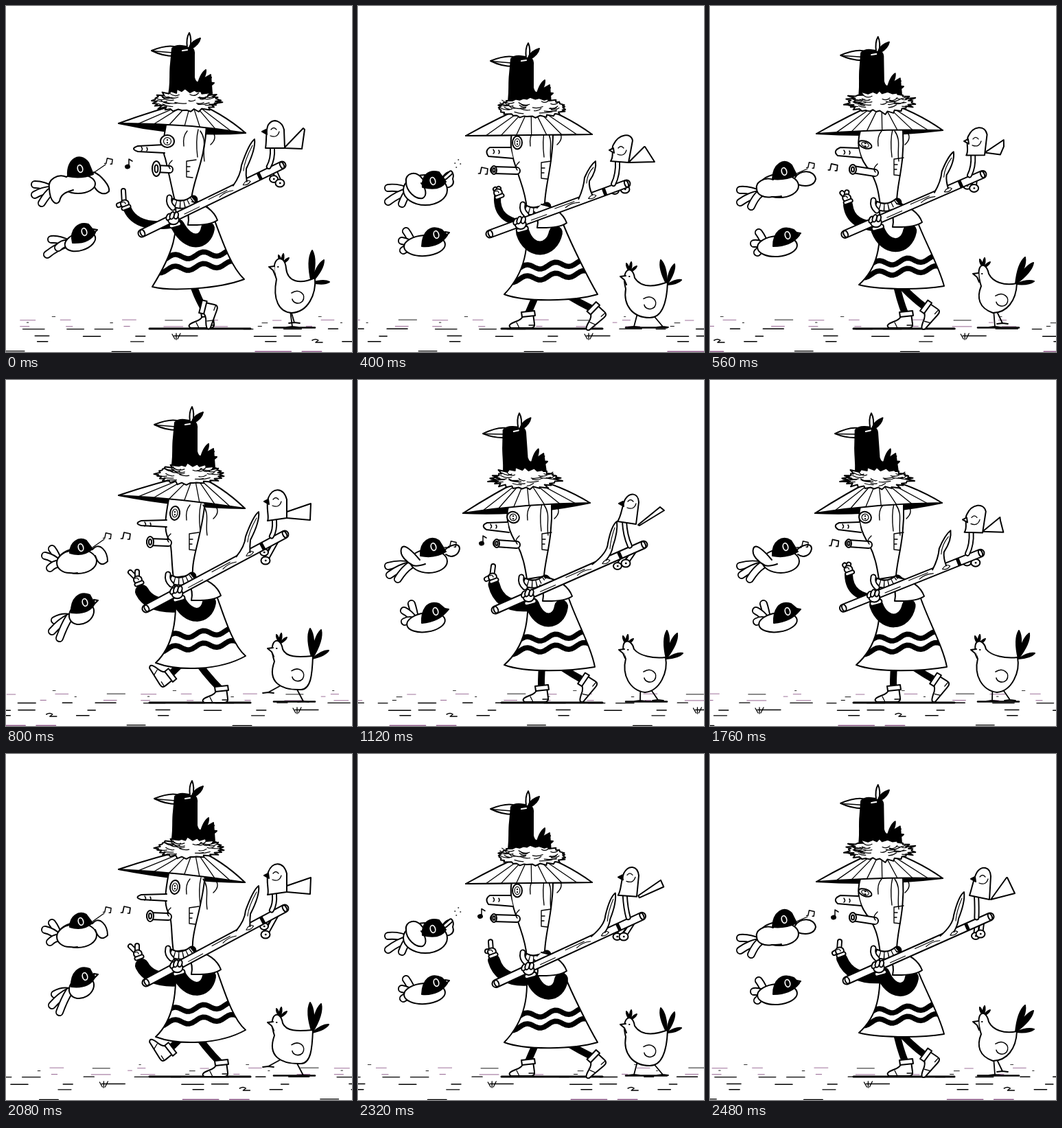
Recreate the animation shown at these times as an HTML page. Size 504 by 504 pixels, loop 2560 ms.

```html
<!DOCTYPE html>
<html lang="en">
<head>
<meta charset="utf-8">
<title>Walk with birds</title>
<style>
html, body { margin: 0; width: 100%; height: 100%; overflow: hidden; background: #fff; }
svg { display: block; width: 504px; height: 504px; }
</style>
</head>
<body>
<svg id="stage" viewBox="0 0 504 504" fill="none" stroke="#000" stroke-width="2" stroke-linejoin="round" stroke-linecap="round"></svg>
<script>
const stage = document.getElementById('stage');
const STEP = 80, FRAMES = 32, SCROLL = 563.2;
const NUM = /-?\d+(\.\d+)?/g;
const nums = s => s.match(NUM).map(Number);

// Blend the numbers of the two key strings around a cyclic phase.
function at(keys, phase, period = 8) {
  phase %= period;
  const ks = Object.keys(keys).map(Number);
  let i = ks.length - 1;
  while (i >= 0 && ks[i] > phase) i--;
  const a = i < 0 ? ks[ks.length - 1] - period : ks[i];
  const b = i + 1 < ks.length ? ks[i + 1] : ks[0] + period;
  const t = (phase - a) / (b - a), to = nums(keys[b % period]);
  let j = 0;
  return keys[(a + period) % period].replace(NUM, n => +(+n + (to[j++] - n) * t).toFixed(1));
}
const val = (keys, phase, period) => nums(at(keys, phase, period));

function random(seed) {
  return () => {
    seed = (seed + 0x6D2B79F5) | 0;
    let t = Math.imul(seed ^ (seed >>> 15), 1 | seed);
    t = (t + Math.imul(t ^ (t >>> 7), 61 | t)) ^ t;
    return ((t ^ (t >>> 14)) >>> 0) / 4294967296;
  };
}

const shape = (d, fill = '#fff') => `<path d="${d}" fill="${fill}"/>`;
const line = (d, w = 1.6, c = '#000', more = '') => `<path d="${d}" stroke="${c}" stroke-width="${w}" ${more}/>`;
const tube = (d, w) => line(d, w) + line(d, w - 3.8, '#fff');
const oval = (x, y, rx, ry, rot = 0, fill = '#fff') =>
  `<ellipse cx="${x}" cy="${y}" rx="${rx}" ry="${ry}" fill="${fill}" transform="rotate(${rot} ${x} ${y})"/>`;
const move = (x, y, body, rot = 0) => `<g transform="translate(${x} ${y}) rotate(${rot})">${body}</g>`;

// Feathers fan out from the first point to each following one.
function fan([bx, by, ...tips], draw) {
  let out = '';
  for (let i = 0; i < tips.length; i += 2) out += draw(bx, by, tips[i], tips[i + 1]);
  return out;
}
const feather = (x, y, u, v) => tube(`M${x} ${y}Q${(x + u) / 2} ${(y + v) / 2 - 4} ${u} ${v}`, 12);
const plume = (x, y, u, v) => {
  const dx = (u - x) * .7, dy = (v - y) * .7, n = .25;
  return shape(`M${x} ${y}Q${x + dx - dy * n} ${y + dy + dx * n} ${u} ${v}Q${x + dx + dy * n} ${y + dy - dx * n} ${x} ${y}Z`, '#000');
};

/* ---- ground ---- */
const rnd = random(11);
const dashes = [];
const row = (y, count, min, max, w, tint) => {
  for (let i = 0; i < count; i++)
    dashes.push({ x: (i + rnd() * .7) * SCROLL / count, y: y + rnd(), n: min + rnd() * (max - min), w, c: rnd() < tint ? '#93618f' : '#000' });
};
row(452, 3, 2, 6, .8, .5);
row(457, 8, 5, 30, .9, .7);
row(461, 5, 2, 8, .9, .3);
row(466, 8, 5, 32, 1, .7);
row(470, 9, 12, 34, 1.4, 0);
row(480.5, 7, 10, 34, 1.5, 0);
row(488.5, 4, 6, 28, 1.4, 0);
row(502.5, 4, 20, 60, 1.3, .2);

function ground(frame) {
  const shift = SCROLL * frame / FRAMES;
  const twice = (x, draw) => {
    const p = (x + shift) % SCROLL;
    return draw(p) + draw(p - SCROLL);
  };
  return dashes.map(d => twice(d.x, x => line(`M${x} ${d.y}h${d.n}`, d.w, d.c))).join('') +
    twice(248, x => move(x, 481, line('M-6 -3L-2 4M0 -4V5M6 -4L2 4', 1.3))) +
    twice(454, x => move(x, 487, line('M-8 0q5 -3 9 0l-4 3h10', 1.5))) +
    line('M209 470H356', 3) + line('M390 468.5H450', 2.6);
}

/* ---- flying birds ---- */
const upper = {
  body: { 0: '105 259 25 14', 2: '104 264 28 18', 5: '98 268 32 22', 6: '103 264 27 17', 7: '101 262 28 17' },
  head: {
    0: 'M90 248C88 222 108 212 120 228L127 245Q110 252 90 248Z',
    2: 'M93 252C93 236 106 228 117 234L126 246Q112 258 93 252Z',
    5: 'M94 264C92 246 104 238 118 242L128 256Q120 270 94 264Z',
    6: 'M91 256C90 234 106 226 118 234L128 250Q112 260 91 256Z',
    7: 'M91 252C92 230 108 220 119 232L126 246Q110 254 91 252Z'
  },
  eye: { 0: '108 237', 2: '109 244', 5: '109 255', 6: '110 243', 7: '108 241' },
  wing: {
    0: 'M88 249C76 244 60 252 63 266C64 286 74 292 78 284C80 272 92 270 98 268',
    2: 'M93 249C84 250 74 258 74 266C74 276 84 281 92 281C96 281 100 282 104 281',
    5: 'M94 252C84 238 68 244 70 256C70 270 84 282 94 280C102 276 98 264 92 258',
    6: 'M90 262C80 250 66 236 63 246C60 256 72 266 80 270C86 272 92 270 98 268',
    7: 'M92 253C78 248 66 258 68 266C68 276 80 280 90 278C96 278 100 278 104 277'
  },
  far: {
    0: 'M128 242C138 246 152 262 150 270C144 276 134 274 128 262',
    2: 'M126 247C136 234 148 250 148 264C140 272 134 268 130 256',
    5: 'M124 248C132 238 142 240 138 252C142 262 130 268 124 262',
    6: 'M126 248C134 240 148 236 148 246C146 256 136 260 128 254',
    7: 'M124 250C130 238 152 238 154 252C152 262 140 264 128 260'
  },
  tail: { 0: '68 268 42 260 42 275 52 287', 2: '78 268 67 246 57 256 64 274', 5: '74 270 44 265 44 285 64 288', 6: '76 270 44 271 46 284 58 290', 7: '72 274 44 268 44 286 60 292' },
  tune: { 0: '150 226', 2: '148 227', 5: '144 225', 6: '138 239', 7: '147 232' }
};
const lower = {
  body: { 0: '108 343 23 13 -18', 2: '110 340 19 15 -30', 5: '97 349 30 15 -4', 6: '99 353 28 14 -8', 7: '98 350 29 15 -4' },
  head: {
    0: 'M97 345C92 325 106 314 120 318L130 330Q122 346 97 345Z',
    2: 'M95 339C94 319 106 307 122 313L129 326Q120 342 95 339Z',
    5: 'M93 350C94 328 106 318 122 326L130 334Q118 352 93 350Z',
    6: 'M93 354C92 336 100 320 118 326L130 336Q118 352 93 354Z',
    7: 'M92 350C92 330 104 318 122 326L130 334Q118 350 92 350Z'
  },
  eye: { 0: '114 329', 2: '115 324', 5: '114 333', 6: '113 337', 7: '113 334' },
  tail: { 0: '90 346 66 340 60 362 76 352', 2: '92 346 71 350 67 366 78 376', 5: '82 352 70 328 64 342 66 356', 6: '84 352 78 326 67 336 68 352', 7: '82 352 71 330 64 346 69 359' }
};
const ringEye = ([x, y]) => `<g stroke="#fff" stroke-width="1.7">${oval(x, y, 3.6, 5.4, -15, '#000')}</g>`;
const pair = line('M-5 4L-3 -5L6 -3L5 5M-5 4h-2.5M5 5h-2.5', 1.7);

function flyers(p) {
  const [tx, ty] = val(upper.tune, p), [ex, ey] = val(lower.eye, p);
  return fan(val(upper.tail, p), feather) + shape(at(upper.far, p)) +
    oval(...val(upper.body, p)) + shape(at(upper.wing, p)) +
    shape(at(upper.head, p), '#000') + ringEye(val(upper.eye, p)) +
    (p === 5 || p === 4
      ? tube('M127 250L135 243', 7) + line('M141 229h.5M146 224h.5M149 230h.5M143 235h.5', 1.5)
      : line(`M126 244L${tx - 5} ${ty + 5}`, 1.3) + move(tx, ty, `<g transform="scale(.85)">${pair}</g>`)) +
    shape(`M${ex + 13} ${ey - 4}l6 1l-5 5Z`) + fan(val(lower.tail, p), feather) +
    oval(...val(lower.body, p)) + shape(at(lower.head, p), '#000') + ringEye([ex, ey]);
}

/* ---- hen ---- */
const hen = {
  body: {
    0: 'M394 398C382 366 406 358 408 382C410 402 428 406 450 396C452 420 440 446 416 447C398 446 388 428 394 398Z',
    2: 'M391 410C380 376 400 372 403 392C408 404 424 404 447 402C446 430 444 450 430 451C400 452 380 440 391 410Z',
    5: 'M390 412C382 382 400 376 403 396C412 410 430 410 451 402C450 430 444 454 425 454C400 454 386 436 390 412Z',
    6: 'M390 406C378 376 398 374 402 392C410 402 430 406 448 404C452 425 440 453 418 455C396 452 384 430 390 406Z',
    7: 'M395 408C384 374 402 370 406 390C412 402 428 408 447 404C446 430 432 447 412 447C392 440 388 425 395 408Z'
  },
  tail: { 0: '445 403 446 356 463 370 471 402', 2: '446 406 443 362 459 364 470 394', 5: '450 406 441 370 461 376 471 399', 6: '449 406 450 365 465 369 473 398', 7: '445 405 459 366 471 374 472 401' },
  comb: { 0: '402 376', 2: '399 384', 5: '396 388', 6: '391 386', 7: '398 382' },
  beak: { 0: '391 383', 2: '389 394', 5: '390 397', 6: '388 396', 7: '391 393' },
  foot: { 0: '420 461', 2: '382 455', 4: '393 465', 5: '402 467', 6: '411 467', 7: '415 467', 8: '417 467', 10: '433 468', 13: '444 467', 14: '437 466', 15: '426 462' }
};
function drawHen(p, q) {
  const leg = k => {
    const [x, y] = val(hen.foot, k, 16), hip = 412 + (x - 412) * .45;
    return line(`M${hip} 446L${x} ${y}l-8 1M${x} ${y}l8 1`, 1.8);
  };
  const [cx, cy] = val(hen.comb, p), [bx, by] = val(hen.beak, p);
  return leg(q) + leg(q + 8) + fan(val(hen.tail, p), plume) + fan([cx, cy, cx - 5, cy - 13, cx + 2, cy - 15, cx + 10, cy - 9], plume) +
    shape(at(hen.body, p)) + shape(`M${bx} ${by - 4}l-8 1l6 5l3 7`) + line(`M${bx + 5} ${by - 3}h.5`, 2) +
    move(0, (cy - 376) * .7, line('M416 418C427 411 438 420 432 430C426 436 418 432 417 427'));
}

/* ---- walker ---- */
const man = {
  foot: { 0: '288 440 -70', 2: '238 430 58', 4: '228 447 14', 5: '247 450 0', 6: '267 450 0', 7: '285 450 0', 8: '293 450 0', 10: '313 451 0', 12: '338 446 -30', 13: '343 442 -40', 14: '329 438 -50', 15: '315 440 -48' },
  dress: {
    0: 'M247 290C250 330 246 356 213 409C240 416 310 412 347 398C328 380 316 345 303 310C300 296 290 288 276 284Z',
    2: 'M245 292C250 335 248 384 218 412C250 424 310 424 349 402C330 386 318 345 306 312C303 300 290 292 276 288Z',
    5: 'M244 305C250 350 244 388 213 420C245 432 315 430 349 420C336 398 312 350 299 318C297 308 285 300 272 292Z',
    6: 'M247 300C250 350 244 388 213 415C245 427 310 424 345 418C340 390 318 350 307 318C302 302 290 296 276 286Z',
    7: 'M247 298C250 350 244 382 217 406C240 413 305 414 341 408C334 380 314 345 303 316C300 302 290 296 276 286Z'
  },
  bands: { 0: '366 383', 2: '373 391', 5: '381 397', 6: '378 394', 7: '375 390' },
  cape: { 0: '-3 0', 2: '2 2', 5: '-7 4', 6: '1 3', 7: '-2 3' },
  scarf: { 0: '0 0', 2: '-2 4', 5: '2 10', 6: '0 8', 7: '0 4' },
  face: {
    0: 'M233 174C228 200 228 212 232 222C236 238 240 258 246 284L270 282C272 255 290 225 292 174',
    2: 'M237 174C232 200 230 218 236 230C243 242 240 262 244 288L272 284C270 258 286 225 290 176',
    5: 'M224 186C220 205 226 225 232 240C236 256 244 270 246 296L272 290C272 262 284 232 284 186',
    6: 'M219 184C214 205 222 225 232 240C240 256 243 270 246 290L271 286C272 262 284 232 282 180',
    7: 'M219 182C212 205 220 225 233 240C242 256 245 266 248 290L272 286C272 258 284 232 281 180'
  },
  eye: { 0: '235 197 10 9 0', 2: '246 194 7 10 5', 5: '232 199 7 9.5 0', 6: '226 200 9 8 20', 7: '226 202 10 5 20' },
  nose: {
    0: 'M230 202L192 204Q180 208 192 212L231 214', 2: 'M234 204L197 205Q186 209 197 212L234 214',
    5: 'M222 206L192 206Q184 211 190 219L226 222', 6: 'M218 207L188 208Q178 212 187 218L220 222',
    7: 'M216 207L190 206Q178 211 186 218L220 221'
  },
  lips: { 0: '219 237 6 11 238 238', 2: '210 236 5 8 236 237', 5: '198 239 4 6 231 240', 6: '202 238 4 6 231 240', 7: '208 238 5 7 240 243' },
  patch: { 0: '269 238', 2: '273 236', 5: '273 240', 6: '274 236', 7: '274 235' },
  hat: { 0: '164 171 349 185 270 138 8', 2: '164 168 348 187 274 137 5', 5: '157 189 341 187 252 142 0', 6: '153 194 338 179 245 141 7', 7: '155 186 339 181 250 138 5' },
  nest: { 0: '263 138 46 14 7', 2: '267 137 46 13 6', 5: '253 148 48 13 4', 6: '244 144 46 14 8', 7: '248 140 46 14 8' },
  crow: { 0: '0 0 0', 2: '4 0 0', 5: '-19 15 0', 6: '-27 10 -4', 7: '-21 6 -1' }
};
const arms = {
  far: {
    0: 'M177 296C186 316 210 324 250 316 12', 2: 'M192 287C196 308 214 322 250 322 9', 5: 'M203 278C202 302 214 314 246 318 10',
    10: 'M198 308C206 324 224 331 256 328 20', 14: 'M198 298C204 322 222 332 254 328 17', 15: 'M192 298C200 318 216 328 252 326 16'
  },
  hand: { 0: '172 287 171 269 164 290', 2: '190 280 180 269 184 275', 5: '203 271 200 267 205 266', 10: '191 290 181 280 191 279', 14: '195 286 197 271 187 290', 15: '188 286 189 273 181 290' },
  near: {
    0: 'M294 324C290 346 266 350 250 320', 2: 'M288 328C284 356 256 356 246 322', 5: 'M288 330C282 359 250 361 240 330',
    10: 'M296 324C292 347 266 350 251 320', 14: 'M296 330C292 356 264 357 254 327', 15: 'M294 326C290 349 264 350 252 320'
  },
  stick: { 0: '198 331 402 232', 2: '195 329 398 240', 5: '192 332 391 259', 10: '204 333 406 225', 14: '200 335 416 240', 15: '199 330 408 237' },
  twig: { 0: '344 232 362 194', 2: '345 235 356 204', 5: '331 250 346 226', 10: '350 228 368 192', 14: '365 238 377 206', 15: '356 235 370 201' }
};
const perch = {
  body: {
    0: 'M378 207C380 195 378 180 382 173C390 162 402 168 405 180L406 207Z', 2: 'M374 210C380 200 378 188 383 178C392 168 406 170 408 182L408 213Z',
    5: 'M368 226C374 218 368 208 372 202C380 186 398 184 400 196L394 228Z', 10: 'M381 205C384 200 378 185 382 172C388 156 404 156 409 174L409 201Z',
    14: 'M378 206C384 198 384 185 389 174C396 163 408 164 409 178L405 210Z', 15: 'M378 206C382 195 384 180 389 172C396 162 408 164 409 178L407 212Z'
  },
  wing: {
    0: 'M405 207L433 178L435 180L431 208Z', 2: 'M408 212L425 192L427 191L441 206Z', 5: 'M394 228L417 205L418 205L432 227Z',
    10: 'M409 192L444 180L443 204L409 201Z', 14: 'M408 211L440 185L446 190L410 212Z', 15: 'M409 212L432 180L433 180L444 203Z'
  },
  beak: { 0: '379 184', 2: '381 189', 5: '372 211', 10: '382 178', 14: '386 181', 15: '386 183' },
  feet: { 0: '390 252 399 258', 2: '376 262 390 264', 5: '374 269 389 267', 10: '376 251 378 263', 14: '378 271 390 267', 15: '387 265 394 262' }
};

function leg(k) {
  const [x, y, rot] = val(man.foot, k, 16);
  const kx = (270 + x) / 2 - 2;
  return line(`M270 398Q${kx} ${(398 + y) / 2 + 3} ${x} ${y}`, 10) +
    move(x, y, shape('M-6 0L8 -2L10 13Q11 19 4 19L-24 19Q-31 15 -18 10Q-8 7 -6 0Z') + shape('M-9 -4L10 -6L11 1L-8 3Z') + line('M-16 11L-12 19M2 15L10 15', 1.3), rot);
}

function bands(p) {
  return val(man.bands, p).map(y => {
    let d = '';
    for (let x = 215; x < 350; x += 4)
      d += `${d ? 'L' : 'M'}${x} ${(y - (x - 245) * .09 + 4 * Math.sin((x - 256) / 6.6)).toFixed(1)}`;
    return line(d, 7.5, '#000', 'clip-path="url(#skirt)"');
  }).join('');
}

function head(p) {
  const [ex, ey, rx, ry, rot] = val(man.eye, p);
  const [kx, ky, kr, kh, mx, my] = val(man.lips, p);
  const [px, py] = val(man.patch, p);
  const nose = at(man.nose, p), [nx, ny, lx] = nums(nose);
  const [sx, sy] = val(man.scarf, p);
  const coil = 'M242 286Q258 294 273 282';
  return shape(at(man.face, p)) + shape(nose) + line(`M${lx + 5} ${ny + 3}q3 4 0 6M${lx + 13} ${ny + 4}q2 3 0 5`, 1.5) +
    tube(`M${kx} ${ky}L${mx} ${my}`, 12) + oval(kx, ky, kr, kh) + oval(kx, ky, kr * .4, kh * .5) +
    line(`M${mx + 4} ${my - 13}q-8 7 -3 12`, 1.4) +
    oval(ex, ey, rx, ry, rot) + line(`M${ex} ${ey - 2}v.3M${ex} ${ey + 2}v.3`, 2.2) +
    `<g stroke-width="1.2">${oval(ex, ey, rx * .55, ry * .6, rot, 'none')}</g>` +
    move(px, py, line('M8 -14L-6 -12L-6 11L3 12M-6 -4h5M-6 3h4', 1.4)) +
    line(`M${nx + 34} 182Q${nx + 27} 190 ${nx + 29} 204M${nx + 50} 180Q${nx + 46} 196 ${nx + 49} 220M${nx + 53} 182C${nx + 63} 196 ${nx + 56} 208 ${nx + 59} 226M${nx + 70} 182Q${nx + 79} 192 ${nx + 68} 202`, 1.4) +
    move(sx, sy, line(coil, 13) + line(coil, 9, '#fff', 'stroke-linecap="butt" stroke-dasharray="5 1.4"') + tube('M238 279Q236 288 243 294', 9));
}

function hatParts(p) {
  const [lx, ly, rx, ry, ax, ay, dep] = val(man.hat, p);
  const mx = (lx + rx) / 2, my = (ly + ry) / 2, front = my - dep;
  let rays = '';
  for (let t = .16; t < .95; t += .12) {
    const u = 1 - t, x = u * u * lx + 2 * t * u * mx + t * t * rx, y = u * u * ly + 2 * t * u * front + t * t * ry;
    rays += `M${x.toFixed(1)} ${y.toFixed(1)}L${(ax + (x - ax) * .25).toFixed(1)} ${(ay + (y - ay) * .25).toFixed(1)}`;
  }
  return {
    under: shape(`M${lx} ${ly}Q${mx} ${front} ${rx} ${ry}Q${mx} ${my + dep * 1.7} ${lx} ${ly}Z`, '#000'),
    top: shape(`M${lx} ${ly}Q${(lx + ax) / 2} ${(ly + ay) / 2 - 3} ${ax} ${ay}Q${(rx + ax) / 2 + 4} ${(ry + ay) / 2 - 7} ${rx} ${ry}Q${mx} ${front} ${lx} ${ly}Z`) + line(rays, 1.3)
  };
}

// Loose straw: long spikes at the sides, short ones above and below.
function nest(p) {
  const [x, y, rx, ry, spike] = val(man.nest, p), r = random(40 + p);
  let edge = '', straw = '';
  for (let i = 0; i < 50; i++) {
    const a = (i + r() * .8) / 50 * Math.PI * 2, out = i % 2 ? spike * r() : -spike * .5 * r();
    const ux = Math.cos(a), uy = Math.sin(a);
    edge += `${i ? 'L' : 'M'}${(x + ux * (rx + out * 1.4)).toFixed(1)} ${(y + uy * (ry + out * .6)).toFixed(1)}`;
  }
  for (let i = 0; i < 24; i++) {
    const u = r() * 1.6 - .8, v = (r() * 1.5 - .75) * Math.sqrt(1 - u * u), n = (9 + r() * 9) * (u > 0 ? 1 : -1);
    straw += `M${(x + u * rx * .9).toFixed(1)} ${(y + v * ry).toFixed(1)}q${(n / 2).toFixed(1)} ${(2 - v * 3).toFixed(1)} ${n.toFixed(1)} ${(r() * 4 - 4).toFixed(1)}`;
  }
  return shape(edge + 'Z') + line(straw, 1.2);
}

function crow(p) {
  const [x, y, rot] = val(man.crow, p);
  const bill = shape('M245 59C234 57 222 61 212 65C222 70 234 73 245 73Z') + line('M213 65.5L243 68', 1.6);
  return move(x, y, bill +
    shape('M242 62Q247 57 256 58L270 60Q275 63 274 72L274 104Q277 116 284 108L298 100L300 128L236 132C241 118 238 100 240 84Z', '#000') +
    fan([278, 120, 291, 93, 299, 104, 303, 112], plume) + shape('M264 61Q262 47 267 39Q271 48 268 61Z') + shape('M267 60Q270 51 283 47Q281 56 270 62Z', '#000') +
    line('M257 65l7 -1', 2.2, '#fff'), rot ? `${rot} 255 110` : 0);
}

function farArm(q) {
  const key = at(arms.far, q, 16), cut = key.lastIndexOf(' ');
  const [x, y, fx, fy, tx, ty] = val(arms.hand, q, 16);
  return line(key.slice(0, cut), +key.slice(cut + 1)) +
    tube(`M${x} ${y}L${fx} ${fy}`, 8) + tube(`M${x} ${y}L${tx} ${ty}`, 8) +
    oval(x + 1, y + 1, 6, 5.5) + line(`M${x - 3} ${y - 1}q4 -2 5 2`, 1.3) + tube(`M${x - 1} ${y + 8}L${x + 7} ${y + 5}`, 7);
}

function pole(q) {
  const [x, y, u, v] = val(arms.stick, q, 16), [mx, my, tx, ty] = val(arms.twig, q, 16);
  const rot = Math.atan2(v - y, u - x) * 180 / Math.PI, n = Math.hypot(u - x, v - y);
  const bx = x + (u - x) * .71, by = y + (v - y) * .71;
  return line(`M${x} ${y}L${u} ${v}`, 13) + line(`M${x} ${y}L${u} ${v}`, 9, '#fff') +
    shape(`M${bx - 12} ${by + 1}Q${mx - 2} ${my + 14} ${mx - 1} ${my}Q${tx - 8} ${ty + 6} ${tx} ${ty}Q${tx + 2} ${ty + 14} ${mx + 6} ${my + 5}Q${mx + 5} ${my + 14} ${bx + 8} ${by - 5}`) +
    line(`M${mx + 2} ${my + 8}Q${mx + 3} ${my - 6} ${tx - 3} ${ty + 9}`, 1.1) +
    move(x, y, oval(1, 0, 3, 5) + oval(n, 0, 2.6, 5) +
      line(`M${n * .84} -5.5V5.5`, 5, '#000', 'stroke-linecap="butt"') +
      line(`M${n * .3} 2h24M${n * .48} -2h30M${n * .55} 2q10 -4 22 0M${n * .72} 1q8 -6 12 0q-6 4 -12 0`, 1.1), rot);
}

function grip(q) {
  const [x, y, u, v] = val(arms.stick, q, 16), gx = x + (u - x) * .22, gy = y + (v - y) * .22;
  return move(gx, gy, tube('M-2 11L9 8', 8) + oval(1, 2, 8, 7) + oval(-6, -2, 3, 5, 25) + oval(-1, -4, 3, 5.5, 20) + oval(5, -4, 3, 5, 15));
}

function perched(q) {
  const [x, y, u, v] = val(arms.stick, q, 16), k = .93, sx = x + (u - x) * k, sy = y + (v - y) * k;
  const body = at(perch.body, q, 16), [bx, by] = nums(body), [kx, ky] = val(perch.beak, q, 16);
  const [ax, ay, cx, cy] = val(perch.feet, q, 16);
  return {
    back: tube(`M${sx - 4} ${sy}L${ax} ${ay}`, 8) + tube(`M${sx + 3} ${sy}L${cx} ${cy}`, 8) +
      oval(ax, ay, 6, 5) + oval(cx, cy, 6.5, 5.5) + line(`M${cx} ${cy}h.5M${ax} ${ay}h.5`, 2.4),
    front: tube(`M${bx + 10} ${by}Q${bx + 11} ${(by + sy) / 2} ${sx - 5} ${sy - 5}`, 8) +
      shape(at(perch.wing, q, 16)) + shape(body) +
      shape(`M${kx} ${ky - 4}l-6 3l7 4Z`, q > 3 && q < 8 ? '#fff' : '#000') + line(`M${kx + 7} ${ky - 4}q4 -5 8 0M${kx + 6} ${ky + 5}q10 4 13 -6`, 1.3)
  };
}

const song = { 0: '180 229', 2: '181 217', 5: '183 240', 10: '175 227', 14: '183 233', 15: '183 233' };
function note(q) {
  const [x, y] = val(song, q, 16);
  return move(x, y, q > 3 && q < 13 ? pair : line('M-1 5V-6L4 -3', 1.5) + oval(-3, 5, 3, 2.4, -15, '#000'));
}

function draw(frame) {
  const p = frame % 8, q = frame % 16;
  const dress = at(man.dress, p), hat = hatParts(p), bird = perched(q);
  const [cx, cy] = val(man.cape, p);
  stage.innerHTML = `<clipPath id="skirt"><path d="${dress}"/></clipPath>` +
    ground(frame) + flyers(p) + drawHen(p, q) +
    leg(q + 8) + leg(q) + farArm(q) + shape(dress) + bands(p) +
    hat.under + head(p) + crow(p) + hat.top + nest(p) +
    line(at(arms.near, q, 16), 20) +
    move(cx, cy, shape('M274 285C292 288 306 298 311 312Q300 320 268 319C270 310 269 302 264 296')) +
    bird.back + pole(q) + grip(q) + bird.front + note(q);
}

let shown = -1;
function tick() {
  const frame = Math.floor(performance.now() / STEP) % FRAMES;
  if (frame !== shown) draw(shown = frame);
  requestAnimationFrame(tick);
}
tick();
</script>
</body>
</html>
```
